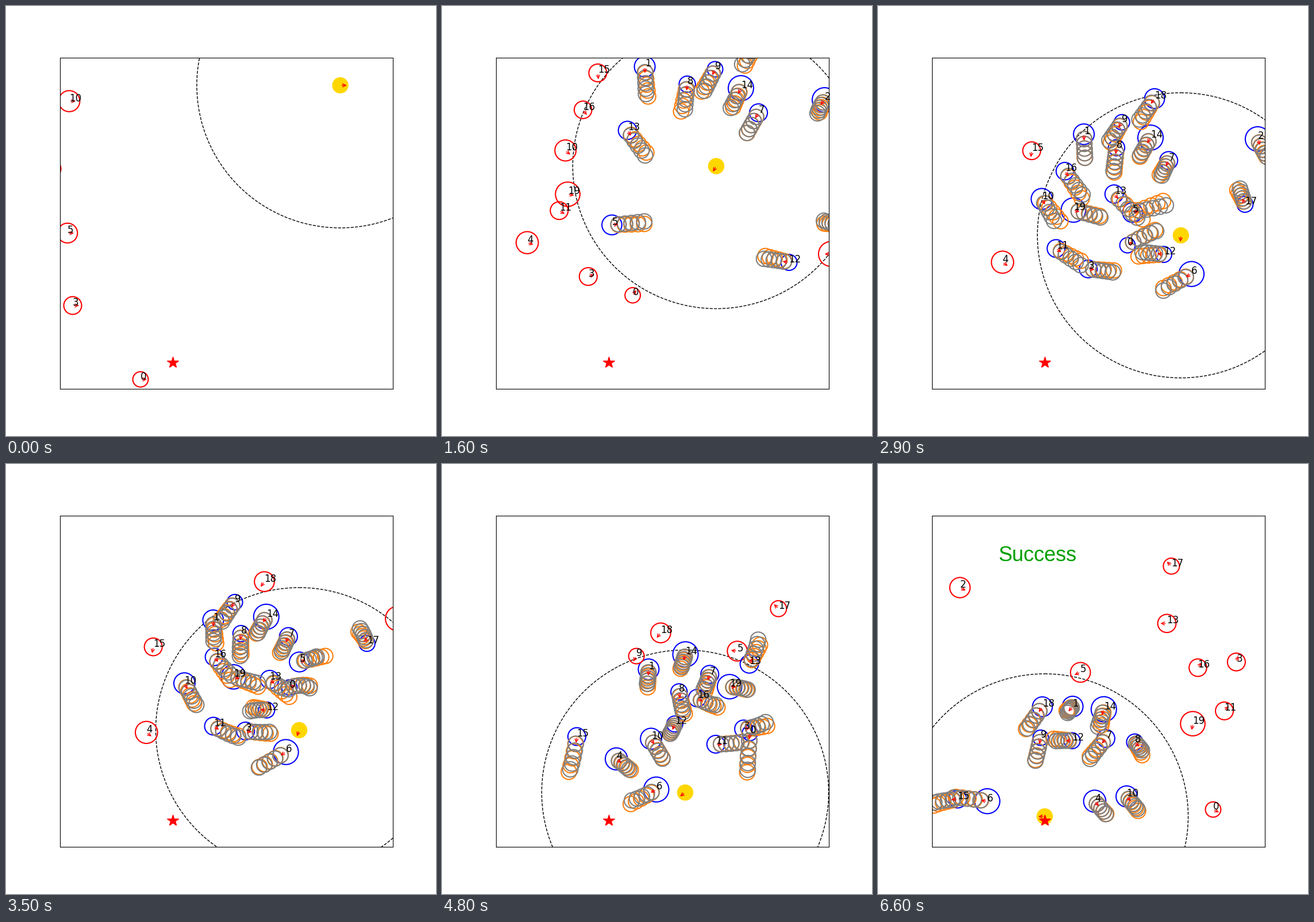
Recreate the animation shown at these times as a matplotlib script. Size 748 px wide and 748 px high, loop 6700 ms.

```python
import numpy as np
import matplotlib.pyplot as plt
from matplotlib.animation import FuncAnimation
from matplotlib.collections import EllipseCollection
from matplotlib.patches import ArrowStyle, Ellipse, FancyArrowPatch

SIZE, DPI = 748, 100
STEPS, INTERVAL = 67, 100
LEFT, RIGHT, TOP, BOTTOM = SIZE * np.array([0.125, 0.9, 0.12, 0.89])
RANGE, SENSE = 249.6, 251.0     # drawn field of view, detection distance
SQUASH = 0.9935                 # height / width of a circle on the axes
KEYS = (0, 24, 40, 56, 71)      # steps at which walkers pass their waypoints
AHEAD = np.arange(1, 6)         # steps looked ahead
MEMORY, DRIFT, ERROR = 3, 0.35, 0.7   # how predictions stray from the real path


class Path:
    """Smooth curve through waypoints reached at the given steps."""

    def __init__(self, points, steps=KEYS):
        self.t, self.p = np.array(steps, float), np.array(points, float)
        self.v = np.gradient(self.p, self.t, axis=0)

    def at(self, step):
        step = np.asarray(step, float)
        i = np.clip(np.searchsorted(self.t, step, side="right") - 1, 0, len(self.t) - 2)
        h = (self.t[i + 1] - self.t[i])[..., None]
        s = (step - self.t[i])[..., None] / h
        near = (1 + 2 * s) * (1 - s) ** 2 * self.p[i] + s * (1 - s) ** 2 * h * self.v[i]
        far = s * s * (3 - 2 * s) * self.p[i + 1] + s * s * (s - 1) * h * self.v[i + 1]
        return near + far

    def velocity(self, step, span=1):
        return (self.at(step) - self.at(step - span)) / span

    def heading(self, step):
        if step == 0:
            return np.array([1.0, 0.0])
        v = self.velocity(step)
        return v / max(np.hypot(*v), 1e-9)


humans = []


def walk(label, radius, *points, steps=KEYS):
    humans.append((str(label), radius, Path(points, steps)))


walk(0, 13.4, (234, 649.5), (388, 446), (528, 390), (536, 560), (610, 616))
walk(1, 18, (345, -55), (356, 180), (361, 308), (354, 395), (330, 433))
walk(2, 21.5, (735, 95), (652, 202), (703, 295), (790, 340), (880, 380))
walk(2, 17.7, (-550, -141), (195, 242), steps=(0, 71))
walk(3, 15.5, (116, 521), (323, 456), (458, 466), (582, 435), (641, 293))
walk(4, 19.3, (54, 385), (192, 430), (267, 485), (338, 543), (396, 609))
walk(5, 17.3, (107, 395), (384, 370), (540, 335), (448, 328), (301, 383))
walk(6, 21.8, (845, 438), (595, 444), (440, 528), (302, 592), (132, 580))
walk(7, 15.6, (623, 65), (520, 240), (480, 326), (446, 409), (369, 513))
walk(8, 14.2, (440, -7), (420, 205), (407, 334), (424, 449), (459, 498))
walk(9, 13.5, (530, -15), (445, 169), (376, 274), (305, 397), (274, 516))
walk(10, 18.4, (110, 165.5), (261, 300), (331, 419), (395, 531), (451, 600))
walk(11, 15.5, (80, 283), (268, 394), (404, 476), (543, 478), (630, 401))
walk(12, 14, (752, 470), (536, 437), (425, 430), (388, 476), (310, 482))
walk(13, 15.9, (232, 66), (373, 284), (492, 392), (551, 289), (471, 276))
walk(14, 22, (577, 29), (492, 197), (438, 294), (412, 368), (383, 457))
walk(15, 15.5, (250, -40), (273, 198), (246, 374), (211, 556), (98, 589))
walk(16, 15.3, (147, 45), (294.5, 246), (393, 368), (495, 417), (587, 315))
walk(17, 14, (790, 375), (652, 366), (616, 286), (551, 219), (490, 157))
walk(18, 17.3, (625, -65), (507, 124), (423, 240), (338, 348), (260, 460))
walk(19, 21.3, (68, 300), (293, 343), (438, 381), (544, 400), (544, 481))

robot_path = Path([(581.5, 138), (496.5, 252), (477, 278.5), (524, 346.5),
                   (510, 463), (423, 571.5), (345, 609.5), (290, 613)],
                  steps=(0, 13, 16, 24, 35, 48, 56, 66))

fig, ax = plt.subplots(figsize=(SIZE / DPI, SIZE / DPI), dpi=DPI)
fig.subplots_adjust(left=0.125, right=0.9, bottom=0.11, top=0.88)
ax.set(xlim=(LEFT, RIGHT), ylim=(BOTTOM, TOP), xticks=[], yticks=[])


def rings(radii, color, z):
    d = 2 * np.asarray(radii, float)
    group = EllipseCollection(
        d, d * SQUASH, np.zeros_like(d), units="xy", offsets=np.zeros((len(d), 2)),
        offset_transform=ax.transData, facecolors="none", edgecolors=color,
        linewidths=1.5, zorder=z)
    ax.add_collection(group, autolim=False)
    return group


def disc(radius, z, **style):
    return ax.add_patch(Ellipse((0, 0), 2 * radius, 2 * radius * SQUASH, zorder=z, **style))


view = disc(RANGE, 1, fill=False, ec="black", lw=1, ls="--")
robot = disc(13.5, 1.5, color="gold", lw=1)
bodies = rings([r for _, r, _ in humans], "red", 2)
guesses = rings([13.4], "tab:orange", 2.1)
futures = rings([13.4], "tab:gray", 2.2)

head = ArrowStyle("->", head_length=4, head_width=2)
paths = [path for _, _, path in humans]
arrows = [ax.add_patch(FancyArrowPatch((0, 0), (1, 1), color="red", arrowstyle=head, zorder=2.5))
          for _ in paths + [robot_path]]
labels = [ax.text(0, 0, name, fontsize=12, color="black", zorder=3) for name, _, _ in humans]
ax.plot(290.3, 620.2, "*", color="red", markersize=15, zorder=4)
success = ax.text(209.4, 168.7, "Success", fontsize=26, color="#00a000",
                  family="Liberation Sans", zorder=5)


def show_trail(group, trail):
    group.set_visible(bool(trail))
    if trail:
        group.set_offsets(np.concatenate(trail))


def update(step):
    here = robot_path.at(step)
    view.center = robot.center = tuple(here)

    spots = np.array([path.at(step) for path in paths])
    seen = np.hypot(*(spots - here).T) < SENSE
    bodies.set_offsets(spots)
    bodies.set_edgecolor(["blue" if s else "red" for s in seen])

    for arrow, path, spot in zip(arrows, paths + [robot_path], [*spots, here]):
        arrow.set_positions(spot, spot + 14 * path.heading(step))

    for label, (x, y) in zip(labels, spots):
        label.set_position((x, y))
        label.set_visible(LEFT <= x <= RIGHT and TOP <= y <= BOTTOM)

    errors = np.random.default_rng(step).normal(0, ERROR, spots.shape)
    real, guess = [], []
    for path, spot, visible, error in zip(paths, spots, seen, errors):
        if visible and step > 0:
            future = path.at(step + AHEAD)
            straight = spot + AHEAD[:, None] * path.velocity(step, MEMORY)
            real.append(future)
            guess.append(future + DRIFT * (straight - future) + AHEAD[:, None] * error)
    show_trail(futures, real)
    show_trail(guesses, guess)

    success.set_visible(step == STEPS - 1)
    return []


anim = FuncAnimation(fig, update, frames=STEPS, interval=INTERVAL, repeat=True)
plt.show()
```
